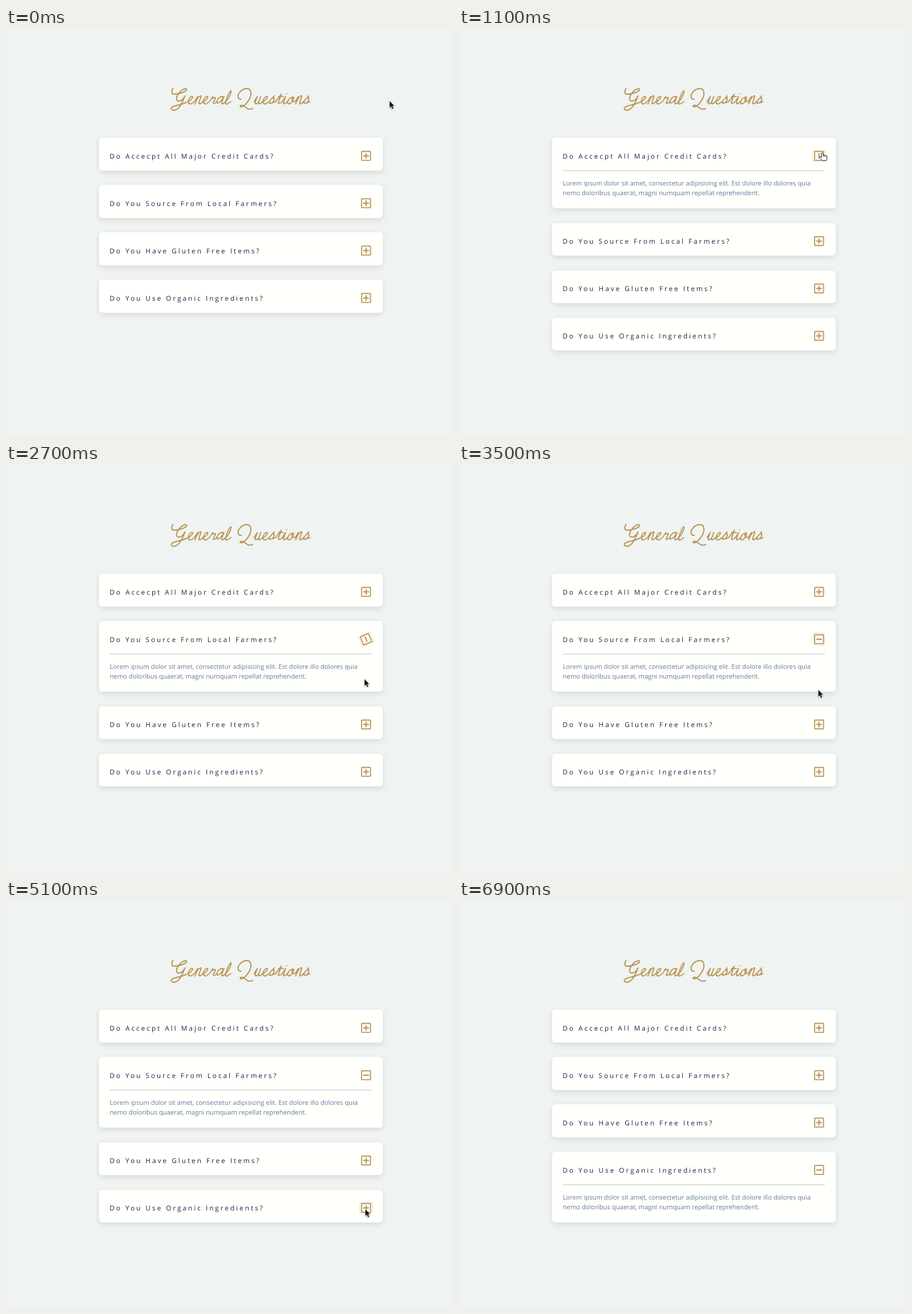
An HTML page that plays this animation: 783x715 px, repeating every 7.1 s.

```html
<!DOCTYPE html>
<html lang="en">
<head>
<meta charset="utf-8">
<title>General Questions</title>
<style>
html, body { margin: 0; width: 100%; height: 100%; overflow: hidden; background: #eff3f2; }
svg { position: absolute; left: 0; top: 0; }
.card {
  position: absolute; left: 163px; width: 497px; border-radius: 6px;
  background: #fffffc; box-shadow: 0 3.5px 10.5px rgba(0, 0, 0, .1);
}
text { font-family: "Open Sans", "Noto Sans", sans-serif; text-rendering: geometricPrecision; }
.ask { font-size: 11.8px; letter-spacing: 2.97px; fill: #102a42; }
.answer text { font-size: 11.26px; fill: #617d98; }
.title path { fill: none; stroke: #bc9859; stroke-width: 2.1; stroke-linecap: round; stroke-linejoin: round; }
.icon { fill: none; stroke: #bc9859; }
.ring { stroke: #c6ae7c; stroke-width: .9; stroke-dasharray: 1 1; }
</style>
</head>
<body>
<svg width="783" height="715" viewBox="0 0 783 715">
  <g class="title" role="img" aria-label="General Questions">
    <path transform="translate(288.5 133)" d="M4-27C1-23 1-17 6-17 14-17 27-21 28-25 28-28 22-27 17-22 10-15 8-6 13-5 18-4 23-9 25-14 21-4 17 6 10 10 3 13-1 9 2 6 6 2 20 2 28-3"/>
    <path transform="translate(405 133)" d="M7-8C0-8 0-16 5-21 11-28 23-30 24-20 25-9 14 3 8 5 3 6 5 1 10 3 16 6 20 12 27 8"/>
  </g>
  <g id="rows"></g>
  <g id="cursor">
    <path id="arrow" d="M0 0V11.8L2.7 9.3 4.6 13.8 6.6 13 4.7 8.6H8.3Z"
      fill="#161616" stroke="#fff" stroke-width="1.2" paint-order="stroke"
      style="filter: drop-shadow(0 1px 1px rgba(0,0,0,.3))"/>
    <g id="hand" transform="translate(-4.5 0)" stroke="#222" stroke-linejoin="round" stroke-linecap="round">
      <path fill="#fff" d="M3.5 1.5Q4.5-.2 6 1L7 5Q8.2 4 9.3 5.2 10.6 4.4 11.5 5.8 13.2 5.5 13.6 7V10.5L12.3 14.5H6L2.5 11 .4 8.4Q.4 6.8 2 7.2L4.2 8.6Z"/>
      <path fill="none" stroke-width=".8" d="M7 5 7.4 7.2M9.3 5.2V7.3M11.5 5.8V7.6"/>
    </g>
  </g>
</svg>
<script>
const $ = s => document.querySelector(s);

// Joined handwriting: each letter enters and leaves 4px above the baseline
const rise = 'l2.5-9', curl = 'c0 5 4 5 6 0', stem = 'v9' + curl;
const strokes = {
  i: rise + stem + 'm-6-14h.1m5.9 14',
  u: rise + stem + 'v-9' + stem,
  n: rise + 'v13v-4c0-8 6-14 6-7v7' + curl,
  r: rise + 'c0 4 2 3 4 2 2-1 2 3 1 6-1 6 3 5 5 1',
  a: 'm9-7c-3-4-9-1-9 5s6 8 9-7' + stem,
  e: 'c4 0 8-9 4-9s-5 9-1 12 5 0 8-3',
  l: 'c4-5 4-19 2-19s-3 10-2 18 4 6 9 1',
  o: 'm7-8c-8 0-8 12-3 12s6-12 3-12 0 8 6 8',
  s: 'l5-10c-1 5 5 5 2 10s-7 3-6 0m6 2l4-2',
  t: 'l5-13v12c0 6 4 5 6 1m-9-9h8m1 9'
};
const write = (word, x) =>
  `<path transform="translate(${x} 133) skewX(-20)" d="M0-4${[...word].map(c => strokes[c]).join('h.5')}"/>`;
$('.title').innerHTML += write('eneral', 317) + write('uestions', 433);

const questions = [
  'Do Accecpt All Major Credit Cards?',
  'Do You Source From Local Farmers?',
  'Do You Have Gluten Free Items?',
  'Do You Use Organic Ingredients?'
];
$('#rows').innerHTML = questions.map(q => `<g class="row">
  <text class="ask" x="181.5" y="36.3">${q}</text>
  <g class="answer">
    <path d="M182 57.6H641" stroke="#d3dad6" stroke-width="1.4"/>
    <text x="181.7" y="83.6">Lorem ipsum dolor sit amet, consectetur adipisicing elit. Est dolore illo dolores quia</text>
    <text x="181.7" y="100.5">nemo doloribus quaerat, magni numquam repellat reprehenderit.</text>
  </g>
  <g class="icon">
    <rect class="ring" x="-9" y="-10.8" width="18" height="21.6"/>
    <rect x="-7.8" y="-7.8" width="15.6" height="15.6" rx="1" stroke-width="1.9"/>
    <path d="M-5 0H5" stroke-width="2.2"/>
    <path class="bar" d="M0-5V5" stroke-width="2.2"/>
  </g>
</g>`).join('');

const rows = [...document.querySelectorAll('.row')].map(el => {
  const card = document.createElement('div');
  card.className = 'card';
  document.body.insertBefore(card, $('svg'));
  const part = s => el.querySelector(s);
  return { el, card, answer: part('.answer'), icon: part('.icon'), ring: part('.ring'), bar: part('.bar') };
});

// Each visit to an icon; hand is when the hand pointer ends, blur when the focus ring goes
const visits = [
  { row: 0, over: 590, press: 1100, open: 1100, leave: 1520, hand: 1600, blur: 2500 },
  { row: 1, over: 2127, press: 2500, open: 2600, leave: 2624, hand: 2700, blur: 5000 },
  { row: 3, over: 4290, press: 5000, open: 5200, leave: 5120, hand: 4900, blur: 6900 }
];
// Pointer moves: start time, end time, x, y; it rests in between
const moves = [
  [200, 400, 650, 189], [500, 700, 635.5, 218], [1500, 1900, 628, 355],
  [2000, 2100, 629, 366.5], [2600, 2700, 628, 377], [3400, 3600, 631, 415],
  [3700, 4000, 628, 499], [4100, 4400, 629, 537], [4800, 4900, 629.5, 542],
  [5600, 5900, 238, 220], [6100, 6200, 70.5, 52.5]
];

const clamp = v => Math.min(1, Math.max(0, v));
const turn = ms => 90 * clamp(ms / 300);
const show = (el, on) => el.style.display = on ? '' : 'none';

function pointerAt(t) {
  let x = 672, y = 128;
  for (const [start, end, toX, toY] of moves) {
    const k = clamp((t - start) / (end - start));
    x += (toX - x) * k;
    y += (toY - y) * k;
  }
  return [x, y];
}

function draw(now) {
  const t = Math.floor(now % 7100 / 100) * 100;
  const current = visits.filter(v => v.open <= t).pop();
  const open = current ? current.row : -1;

  rows.forEach((r, i) => {
    const visit = visits.find(v => v.row === i);
    const top = 192.4 + 83 * i + (open < i && current ? 66.4 : 0);
    const angle = visit ? turn(t - visit.over) - turn(t - visit.leave) : 0;
    r.card.style.top = top + 'px';
    r.card.style.height = (i === open ? 124 : 57.4) + 'px';
    r.el.setAttribute('transform', `translate(0 ${top})`);
    r.icon.setAttribute('transform', `translate(630.7 31.7) rotate(${angle})`);
    show(r.answer, i === open);
    show(r.bar, i !== open);
    show(r.ring, visit && t >= visit.press && t < visit.blur);
  });

  const hand = visits.some(v => t >= v.over && t < v.hand);
  $('#cursor').setAttribute('transform', `translate(${pointerAt(t)})`);
  show($('#cursor'), t < 6500);
  show($('#arrow'), !hand);
  show($('#hand'), hand);
}

const start = performance.now();
function loop() {
  draw(performance.now() - start);
  requestAnimationFrame(loop);
}
loop();
</script>
</body>
</html>
```
